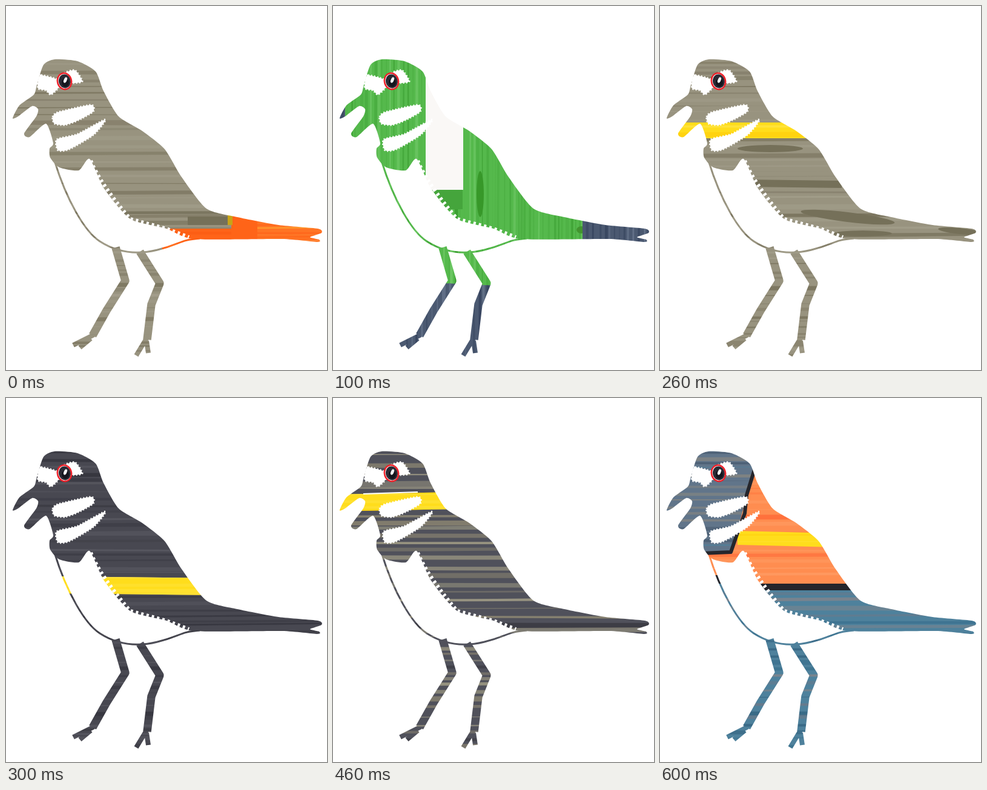
An HTML page with a canvas that plays this animation: 530 by 600 pixels, repeating every 0.7 s.

```html
<!DOCTYPE html>
<html lang="en">
<head>
<meta charset="utf-8">
<title>Colour-changing bird</title>
<style>
html, body { margin: 0; width: 100%; height: 100%; overflow: hidden; background: #fff; }
canvas { display: block; }
</style>
</head>
<body>
<canvas id="stage" width="530" height="600"></canvas>
<script>
const ctx = document.getElementById('stage').getContext('2d');
ctx.lineJoin = 'round';

let state = 1;
const seed = n => { state = n * 15978037 % 2147483647; };
const rand = (a = 0, b = 1) => a + (b - a) * (state = state * 16807 % 2147483647) / 2147483647;

// Smooth closed curve through a few key points.
function curve(text) {
  const pts = text.trim().split(/\s+/).map(p => p.split(',').map(Number));
  const at = i => pts[(i + pts.length) % pts.length];
  const path = new Path2D();
  path.moveTo(...pts[0]);
  pts.forEach((p, i) => {
    const q = at(i + 1), before = at(i - 1), after = at(i + 2);
    const lead = k => p[k] + (q[k] - before[k]) / 9;
    const tail = k => q[k] - (after[k] - p[k]) / 9;
    path.bezierCurveTo(lead(0), lead(1), tail(0), tail(1), ...q);
  });
  return path;
}

// Strip whose right end is shifted down by tilt.
const box = (x0, y0, x1, y1, tilt = 0) =>
  new Path2D(`M${x0} ${y0}L${x1} ${y0 + tilt}L${x1} ${y1 + tilt}L${x0} ${y1}Z`);

function fill(color, path) {
  ctx.fillStyle = color;
  ctx.fill(path);
}

function line(color, width, path, dash = []) {
  ctx.strokeStyle = color;
  ctx.lineWidth = width;
  ctx.setLineDash(dash);
  ctx.stroke(new Path2D(path));
}

function oval(x, y, rx, ry, tilt = 0) {
  const path = new Path2D();
  path.ellipse(x, y, rx, ry, tilt, 0, 7);
  return path;
}

const body = curve(`11,185 22,164 46,146 51,130 62,97 80,88 118,91 148,108 161,140 186,182
  225,206 262,236 290,282 331,334 382,348 450,361 515,367 521,374 502,381 517,385 514,389
  455,384 310,384 265,367 205,351 162,301 138,252 120,271 88,266 73,250 72,235 78,226
  66,194 39,216 30,210 50,182 53,170 43,165 20,182`);
const belly = 'M80 255C100 320 130 372 155 388S210 412 250 402S285 386 320 383';
const legs = 'M181 398L197 453L166 502L143 543M221 405L254 457L240 492L233 550';
const feet = 'M145 542L111 559M140 548L122 563M232 548L215 576M232 552L235 572';
const wing = 'M140 255Q155 292 205 351L265 367L302 381';
const patches = [
  '58,114 84,121 87,134 74,146 66,139 53,136 53,122',
  '96,111 114,106 126,124 112,127 100,126',
  '77,183 86,175 140,163 144,174 120,188 98,196 80,194',
  '84,220 118,211 164,187 145,212 105,236 86,238'
].map(curve);

// Marker colour with wavering streaks; upright swaps the axes.
function paint(area, base, inks, gap, n, upright) {
  seed(n);
  ctx.save();
  ctx.clip(area);
  ctx.fillStyle = base;
  ctx.fillRect(0, 0, 530, 600);
  if (upright) ctx.transform(0, 1, 1, 0, 0, 0);
  for (let y = 0; y < 610; y += gap * rand(.6, 1.4)) {
    const h = gap * rand(.15, .65), tilt = rand(-5, 2);
    ctx.fillStyle = inks[Math.floor(rand(0, inks.length))];
    ctx.globalAlpha = rand(.5, 1);
    ctx.beginPath();
    ctx.moveTo(0, y);
    ctx.quadraticCurveTo(rand(100, 400), y + rand(-3, 3), 610, y + tilt);
    ctx.lineTo(610, y + h + tilt);
    ctx.quadraticCurveTo(rand(100, 400), y + h + rand(-3, 3), 0, y + h);
    ctx.fill();
  }
  ctx.restore();
}

const all = box(0, 0, 530, 600);
const shade = '#757059';
const grey = n => paint(all, '#98937f', ['#7b755f', '#87816d', '#a29d8a'], 11, n);
const yellow = area => paint(area, '#ffdd1c', ['#ffcf0c', '#ffe33a'], 9, 8);

const coats = [
  () => {
    grey(4);
    fill(shade, box(300, 347, 368, 361));
    paint(box(258, 367, 415, 410), '#ff6418', ['#ff7424', '#fb5c12'], 9, 2);
    fill('#ff6418', box(372, 330, 415, 400));
    paint(box(415, 330, 530, 400), '#ff7424', ['#ffa22c', '#ff6418', '#ff8c3c'], 5, 5);
    fill('#c8a416', box(366, 340, 374, 361));
  },
  () => {
    paint(all, '#55b94c', ['#3b9f31', '#48ad3f', '#6bc662'], 7, 6, true);
    fill('#379829', oval(243, 310, 6, 38));
    fill('#45a53c', box(160, 300, 214, 335));
    fill('#faf8f6', box(153, 110, 215, 303));
    fill('#42952f', oval(410, 369, 8, 6));
    for (const area of [box(412, 340, 530, 400), box(0, 160, 20, 190), box(100, 453, 270, 590, 8)])
      paint(area, '#4b5971', ['#37455f', '#64728a'], 8, 7, true);
  },
  () => {
    grey(9);
    fill(shade, oval(182, 235, 54, 6));
    fill(shade, box(140, 286, 300, 298, 2));
    fill(shade, oval(310, 348, 78, 8, .12));
    fill(shade, oval(335, 375, 48, 5));
    fill(shade, oval(495, 371, 36, 5, .1));
    yellow(box(0, 192, 270, 218));
  },
  () => {
    paint(all, '#484851', ['#35353e', '#3d3d46', '#56565f'], 10, 11);
    yellow(box(0, 293, 345, 321, 4));
  },
  () => {
    paint(all, '#50515b', ['#979381', '#989480', '#3b3b43', '#85806f'], 13, 15);
    yellow(box(0, 159, 200, 187, -4));
    line('#fff', 2, 'M50 158L140 155');
  },
  () => {
    paint(all, '#5c92ad', ['#427892', '#4c829e', '#70a2b9'], 10, 18);
    fill('#427892', oval(60, 146, 11, 8));
    paint(box(0, 312, 360, 346, -4), '#ff9d20', ['#f8bc38', '#f9a62c'], 12, 5);
  },
  () => {
    paint(all, '#4e819c', ['#386986', '#69798a', '#7d848c', '#3d7390'], 11, 21);
    paint(box(60, 80, 340, 306), '#ff8d50', ['#ff6f3b', '#ff7d42', '#ff9a60'], 11, 14);
    yellow(box(128, 219, 290, 242, 4));
    fill('#24252b', box(140, 306, 340, 317));
    fill('#24252b', box(80, 292, 110, 306));
    paint(new Path2D('M0 80H170L142 165L118 257H0Z'), '#61758a', ['#4b5e73', '#858581', '#507f99'], 10, 12);
    line('#25262c', 6, 'M156 118L143 160L140 190L127 225L117 254L70 256');
  }
];

function eye() {
  fill('#fff', oval(96, 124, 12, 13.5));
  fill('#292a34', oval(97, 124, 10, 11.5, -.2));
  fill('#14151d', oval(98, 126, 6, 7));
  fill('#f4f4f6', oval(98, 122, 2.5, 5, .4));
  ctx.setLineDash([]);
  ctx.strokeStyle = '#ed2029';
  ctx.lineWidth = 2.5;
  ctx.stroke(oval(96.5, 124, 11.5, 13.5, -.25));
}

function draw(coat) {
  ctx.clearRect(0, 0, 530, 600);
  fill('#000', body);
  line('#000', 3, belly);
  line('#000', 13.5, legs);
  line('#000', 8, feet);
  // The coat only covers the silhouette drawn above.
  ctx.globalCompositeOperation = 'source-atop';
  coat();
  ctx.globalCompositeOperation = 'source-over';
  line('#fff', 6, wing, [4, 5]);
  for (const patch of patches) {
    fill('#fff', patch);
    line('#fff', 3, patch, [2, 3]);
  }
  eye();
}

let shown = -1;
const start = performance.now();
function tick() {
  const i = Math.floor((performance.now() - start) / 100) % coats.length;
  if (i !== shown) draw(coats[shown = i]);
  requestAnimationFrame(tick);
}
tick();
</script>
</body>
</html>
```
